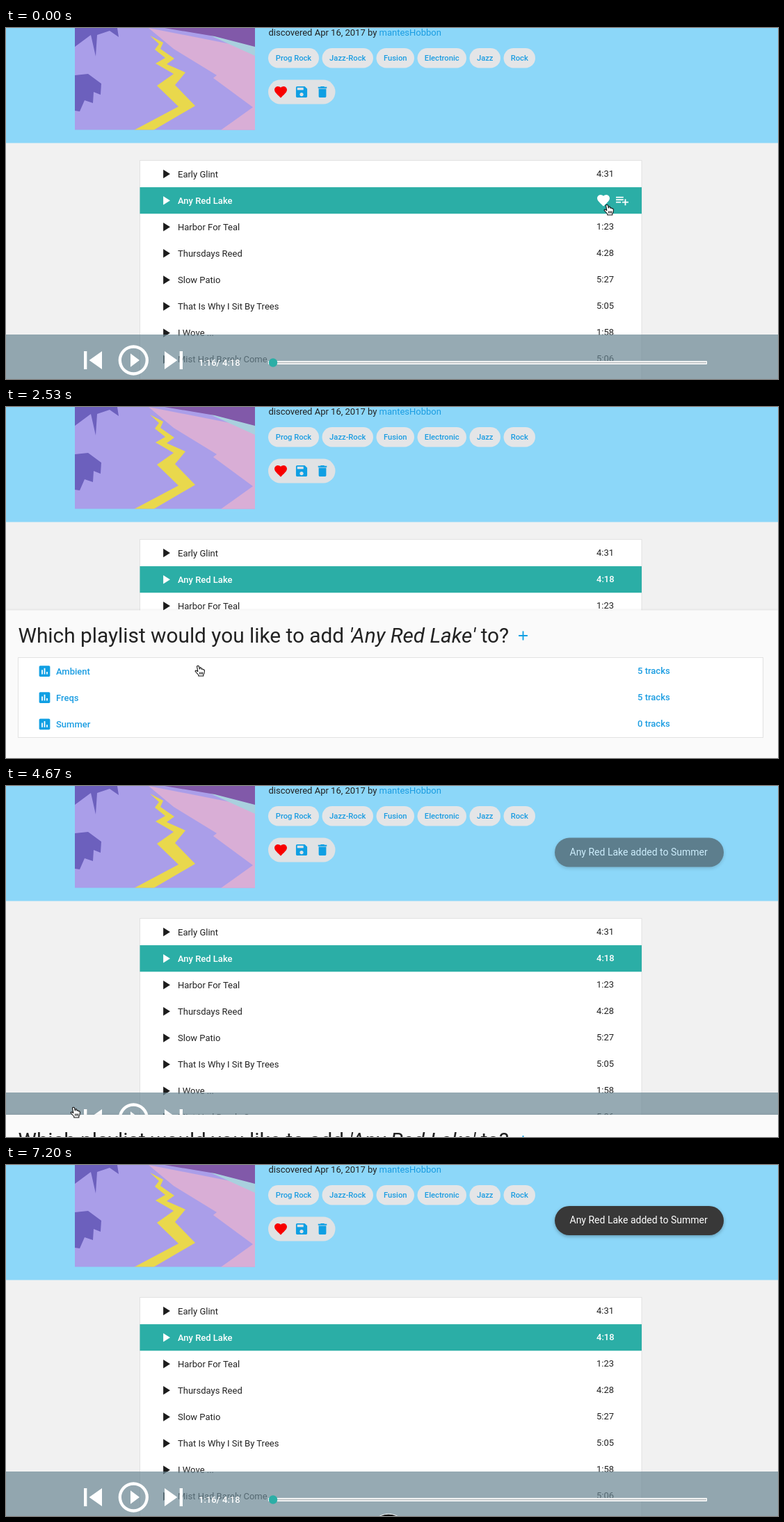
Animation, 1110 px wide and 505 px high, one loop 7270 ms. Source, as an HTML page:

```html
<!DOCTYPE html>
<html lang="en">
<head>
<meta charset="utf-8">
<title>Add a track to a playlist</title>
<style>
  html, body { margin: 0; width: 100%; height: 100%; overflow: hidden; background: #f1f1f1; }
  svg { display: block; width: 100%; height: 100%; }
  text { font: 13px Roboto, sans-serif; fill: #222; white-space: pre; }
  .medium { font-weight: 500; }
  .link { fill: #1b9de2; }
  .white { fill: #fff; }
</style>
</head>
<body>
<svg id="stage" viewBox="0 0 1110 505"></svg>
<script>
const LOOP = 7270, ROW = 38.1, TRACK = 'Any Red Lake', BLUE = '#0f9fe3', TEAL = '#2baea6';

const ICONS = {
  heart: 'M12 21.35l-1.45-1.32C5.4 15.36 2 12.28 2 8.5 2 5.42 4.42 3 7.5 3c1.74 0 3.41.81 4.5 2.09C13.09 3.81 14.76 3 16.5 3 19.58 3 22 5.42 22 8.5c0 3.78-3.4 6.86-8.55 11.54z',
  save: 'M17 3H5c-1.1 0-2 .9-2 2v14c0 1.1.9 2 2 2h14c1.1 0 2-.9 2-2V7zm-5 16c-1.66 0-3-1.34-3-3s1.34-3 3-3 3 1.34 3 3-1.34 3-3 3zm3-10H5V5h10z',
  trash: 'M6 19c0 1.1.9 2 2 2h8c1.1 0 2-.9 2-2V7H6zM19 4h-3.5l-1-1h-5l-1 1H5v2h14z',
  listAdd: 'M14 10H2v2h12zm0-4H2v2h12zm4 8v-4h-2v4h-4v2h4v4h2v-4h4v-2zM2 16h8v-2H2z',
  chart: 'M19 3H5c-1.1 0-2 .9-2 2v14c0 1.1.9 2 2 2h14c1.1 0 2-.9 2-2V5c0-1.1-.9-2-2-2zM9 17H7v-7h2zm4 0h-2V7h2zm4 0h-2v-4h2z',
  play: 'M8 5v14l11-7z',
  previous: 'M6 6h2v12H6zm3.5 6l8.5 6V6z',
  next: 'M6 18l8.5-6L6 6zM16 6v12h2V6z',
  playRing: 'M10 16.5l6-4.5-6-4.5zM12 2a10 10 0 1 0 0 20 10 10 0 0 0 0-20zm0 18a8 8 0 1 1 0-16 8 8 0 0 1 0 16z',
  plus: 'M19 13h-6v6h-2v-6H5v-2h6V5h2v6h6z'
};

const icon = (name, cx, cy, size, fill) =>
  `<path d="${ICONS[name]}" fill="${fill}" fill-rule="evenodd" transform="translate(${cx - size / 2} ${cy - size / 2}) scale(${size / 24})"/>`;
const text = (x, y, content, attrs = '') => `<text x="${x}" y="${y}" ${attrs}>${content}</text>`;
const rect = (x, y, w, h, fill, attrs = '') =>
  `<rect x="${x}" y="${y}" width="${w}" height="${h}" fill="${fill}" ${attrs}/>`;
const shape = (points, fill) => `<polygon points="${points}" fill="${fill}"/>`;

const tracks = [
  ['Early Glint', '4:31'], [TRACK, '4:18'], ['Harbor For Teal', '1:23'], ['Thursdays Reed', '4:28'],
  ['Slow Patio', '5:27'], ['That Is Why I Sit By Trees', '5:05'], ['I Wove ...', '1:58'], ['Mist Had Barely Come', '5:06']
];
const tags = [['Prog Rock', 377, 73], ['Jazz-Rock', 454.5, 73.5], ['Fusion', 532.5, 54.5],
  ['Electronic', 591.5, 70.5], ['Jazz', 666.5, 44.5], ['Rock', 715.5, 45.5]];
const playlists = [['Ambient', 5], ['Freqs', 5], ['Summer', 0]];
const playlistUrl = id => 'https://www.quovell.example/list/' + id;
const links = ['41c90fae25386110057bc2da', '73d18cab40625900021fe8bc', '92b5d04771e83f0006c3207a'].map(playlistUrl);

const cover = `<svg x="99" y="0" width="259" height="146.5" viewBox="99 0 259 146.5">
  ${rect(99, 0, 259, 147, '#aa9ee9')}
  ${shape('205,0 358,30 358,147 309,147 355,114 298,72 303,68 241,30', '#d9aed6')}
  ${shape('309,147 358,113 358,147', '#d9aed6')}
  ${shape('270,0 358,24 358,40', '#a9d0de')}
  ${shape('228,0 358,0 358,27 300,12', '#8159a9')}
  ${shape('99,0 160,0 162,13 149,4 131,10 129,41 122,10 99,27', '#6c60bd')}
  ${shape('99,68 118,66 137,80 136,96 126,92 125,108 113,104 106,120 99,119', '#6c60bd')}
  ${shape('207,11 226,21 222,30 242,44 231,52 258,64 243,82 272,112 212,147 184,147 248,113 217,83 241,66 215,51 229,43 214,31 220,23', '#e9d84c')}
</svg>`;

const header = rect(0, 0, 1110, 165.5, '#8cd7f9') + cover +
  text(377.5, 11.3, 'discovered Apr 16, 2017 by <tspan class="link">mantesHobbon</tspan>') +
  tags.map(([name, x, w]) => rect(x, 29, w, 28.5, '#e4e5e7', 'rx="14.2"') +
    text(x + w / 2, 47, name, 'class="medium link" text-anchor="middle" style="font-size:11.2px"')).join('') +
  rect(377, 74.5, 96.5, 35, '#e0e2e4', 'rx="17.5"') +
  icon('heart', 395, 92, 21.5, '#f80000') + icon('save', 425, 92, 21.5, BLUE) + icon('trash', 455, 92, 21.5, BLUE);

const trackList = rect(192.5, 190.5, 721.5, 330, '#fff', 'stroke="#e2e2e2"') +
  tracks.map(([name, length], i) => {
    const y = 191 + i * ROW, mid = y + ROW / 2, active = i === 1;
    const style = active ? 'class="medium white"' : '';
    return (active ? rect(192.5, y, 721.5, ROW, TEAL) : '') +
      icon('play', 229.7, mid, 21.5, active ? '#fff' : '#1c1c1c') +
      text(247, mid + 4.5, name, style) +
      text(849, mid + 3.6, length, style + (active ? ' id="length"' : ''));
  }).join('') +
  `<g id="actions">${icon('heart', 859, 248, 21.5, '#fff')}${icon('listAdd', 886, 248, 21.5, '#fff')}</g>`;

const player = rect(0, 441, 1110, 64, '#6a8693', 'id="bar"') +
  icon('previous', 125, 478, 52, '#fff') + icon('playRing', 183.3, 478, 52, '#fff') + icon('next', 241, 478, 52, '#fff') +
  text(277, 486, '1:16/ 4:18', 'class="medium white"') +
  rect(377, 479, 631, 5, '#fff', 'rx="1"') + rect(378, 480.5, 629, 2, '#bfc3c6') +
  `<circle cx="384" cy="481.5" r="6.2" fill="${TEAL}"/>`;

const toast = `<g id="toast">${rect(789, 59, 243, 42, '#393939', 'rx="21" filter="url(#shadow)"')}
  ${text(810.5, 84, TRACK + ' added to Summer', 'class="white" style="font-size:14px"')}</g>`;

const sheet = `<g id="sheet">${rect(0, 292.5, 1110, 213, '#fafafa', 'filter="url(#shadow)"')}
  ${text(17.5, 339.3, `Which playlist would you like to add <tspan font-style="italic">'${TRACK}'</tspan> to?`, 'style="font-size:29.8px"')}
  ${icon('plus', 743.5, 329, 22, BLUE)}
  ${rect(17.5, 360.5, 1071, 115, '#fff', 'stroke="#e2e2e2"')}
  ${playlists.map(([name, count], i) => {
    const y = 361 + i * ROW, mid = y + ROW / 2;
    return rect(18, y, 1070, ROW, '#e8e8e8', 'class="hover"') + icon('chart', 55.5, mid, 21, BLUE) +
      text(72, mid + 4.6, name, 'class="medium link"') +
      text(908, mid + 3.6, count + ' tracks', 'class="medium link count"');
  }).join('')}</g>`;

const status = `<g id="status"><path d="M-1 506V495.5H364q3.5 0 3.5 3.5V506z" fill="#ececec" stroke="#b5b5b5"/>
  ${text(0, 506.5, '', 'id="address" style="font:10px Open Sans,sans-serif"')}</g>`;

const pointer = `<g id="ring" fill="none"><circle r="25" stroke="#fff" stroke-opacity=".75" stroke-width="5"/>
    <circle r="25" stroke="#0c0c0c" stroke-width="2.6"/></g>
  <path id="hand" fill="#fff" stroke="#111" stroke-width="1.1" stroke-linejoin="round"
    d="M-1.5 1.2Q0-.8 1.5 1.2L2.4 5Q4-.0 5 5.2Q6.700 4 7.300 6Q9.200 5.200 9.500 7.500L8.800 11.500 7.800 13V15H.8V13.500L-3.800 8.500Q-4 6.600-2.200 7.200L-.2 8.500zM2.600 9.500V12.500M4.600 9.500V12.500M6.500 9.500V12.500"/>
  <path id="arrow" fill="#000" stroke="#fff" stroke-width="1" d="M0 0V13.500L3.200 10.600 5.300 15.300 7.500 14.300 5.500 9.800H9.700z"/>`;

document.getElementById('stage').innerHTML =
  `<filter id="shadow" x="-10%" y="-30%" width="120%" height="170%"><feDropShadow dx="0" dy="2" stdDeviation="2.5" flood-opacity=".28"/></filter>` +
  rect(0, 0, 1110, 505, '#f1f1f1') + header + trackList + player + toast + sheet + status + pointer;

const $ = id => document.getElementById(id);
const show = (el, on) => el.setAttribute('visibility', on ? 'visible' : 'hidden');
const place = (el, x, y) => el.setAttribute('transform', `translate(${x} ${y})`);
const clamp = v => Math.min(1, Math.max(0, v));
const progress = (t, start, duration) => clamp((t - start) / duration);
const easeOut = p => 1 - (1 - p) ** 3;
const between = (t, a, b) => t >= a && t < b;

// time, x, y of the pointer's tip
const path = [[0, 864, 254], [250, 864, 254], [750, 881, 248], [1800, 881, 248], [2530, 276, 372],
  [3000, 193, 432], [3600, 97, 462], [5000, 97, 462], [5200, 96, 460], [5600, 96, 460], [6500, 550, 529], [LOOP, 550, 529]];

function pointerAt(t) {
  const i = path.findIndex(p => p[0] > t);
  const [t0, x0, y0] = path[i - 1], [t1, x1, y1] = path[i];
  const p = (t - t0) / (t1 - t0), e = p * p * (3 - 2 * p);
  return [x0 + (x1 - x0) * e, y0 + (y1 - y0) * e];
}

const hovers = document.querySelectorAll('.hover'), counts = document.querySelectorAll('.count');

function draw(now) {
  const t = now % LOOP, [x, y] = pointerAt(t);

  const onTrack = t < 2500 && y < 267;
  show($('actions'), onTrack);
  show($('length'), !onTrack);

  const opened = easeOut(progress(t, 1900, 350)), closed = easeOut(progress(t, 4560, 250));
  const sheetOpen = opened - closed;
  place($('sheet'), 0, (1 - sheetOpen) * 218);
  show($('sheet'), sheetOpen > 0);

  const hovered = between(t, 2570, 4560) ? Math.min(2, Math.floor((y - 361) / ROW)) : -1;
  hovers.forEach((el, i) => show(el, i === hovered));
  counts.forEach((el, i) => el.setAttribute('opacity', i === hovered ? 0 : 1));
  show($('status'), hovered >= 0);
  $('address').textContent = links[hovered] || '';

  $('bar').setAttribute('opacity', between(t, 5230, 6200) ? 1 : 0.7);

  const toastIn = easeOut(progress(t, 4600, 300));
  place($('toast'), 0, (1 - toastIn) * 35);
  $('toast').setAttribute('opacity', toastIn);

  const clicking = between(t, 1680, 1840) || between(t, 4130, 4300) || t >= 7130;
  const isHand = t < 4760;
  show($('ring'), clicking);
  show($('hand'), isHand);
  show($('arrow'), !isHand);
  ['ring', 'hand', 'arrow'].forEach(id => place($(id), x, y));
}

function frame(now) {
  draw(now);
  requestAnimationFrame(frame);
}
draw(0);
requestAnimationFrame(frame);
</script>
</body>
</html>
```
